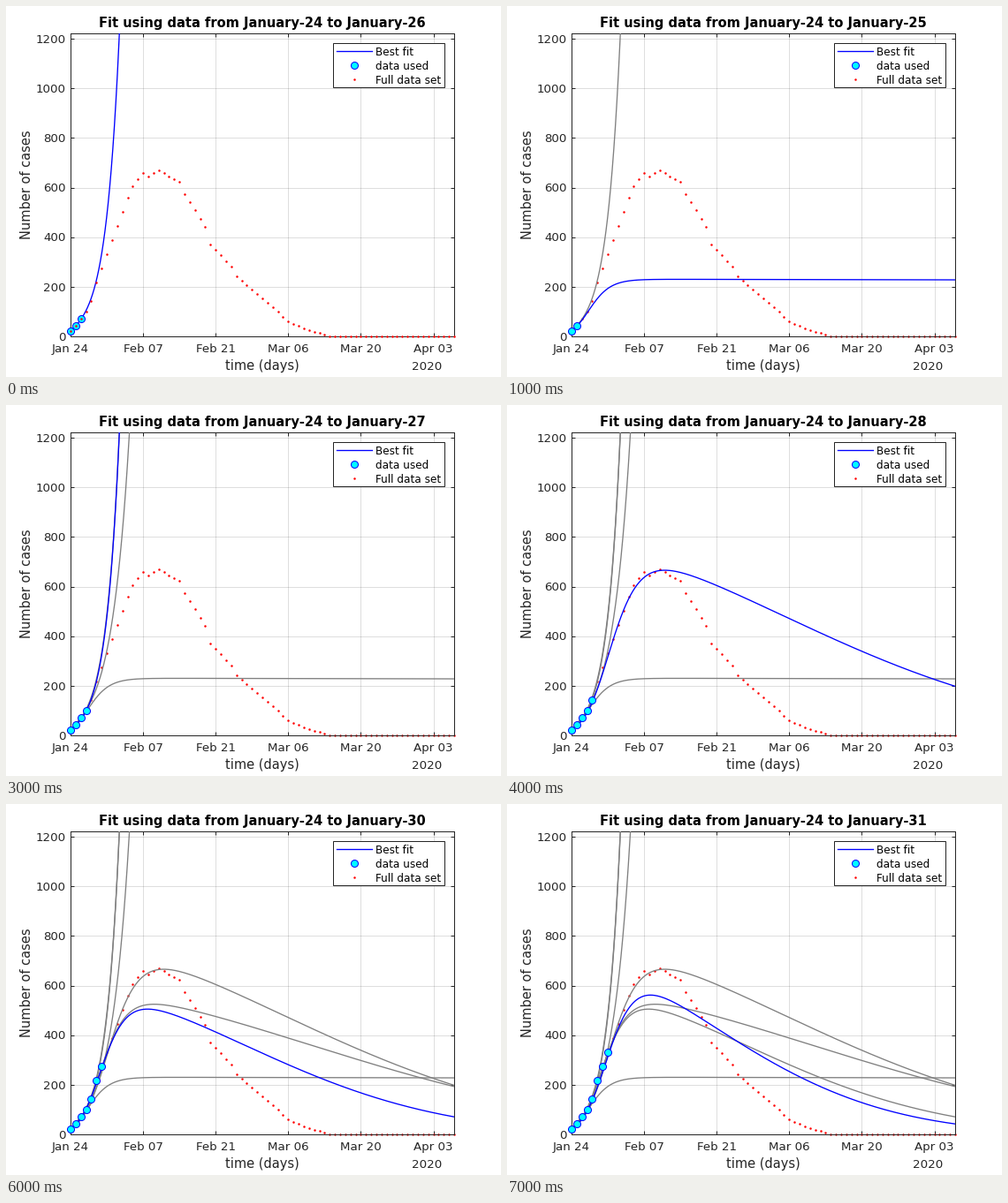
A matplotlib script that plays this animation: 560x420 px, repeating every 8 s.

```python
import numpy as np
import matplotlib.pyplot as plt
from matplotlib.animation import FuncAnimation
from matplotlib.patches import Rectangle

W, H = 560, 420
PT = 0.72  # points per pixel at 100 dpi
LEFT, TOP, WIDE, TALL = 73, 31, 434, 343
DAYS, CASES = 74, 1222
START = 23
INK = "#262626"
GRAY = "#808080"

plt.rcParams["font.family"] = "DejaVu Sans"

# Daily counts, straight between a few turning points
turns = [(0, START), (1, 43), (3, 101), (4, 144), (5, 219), (11, 561),
         (12, 606), (14, 660), (15, 645), (17, 670), (21, 623), (22, 574),
         (26, 442), (27, 372), (31, 282), (32, 244), (40, 98), (42, 60),
         (46, 25), (50, 0)]
days = np.arange(DAYS + 1)
cases = np.interp(days, *zip(*turns))

t = np.linspace(0, DAYS, 1481)


def growth(rate, boost):
    """Outbreak that starts fast and then grows exponentially."""
    y = START * np.exp(np.minimum(rate * t + boost * (1 - np.exp(-t)), 5))
    return np.where(y < 1500, y, np.nan)


def wave(size, rate, decay, bend):
    """Sigmoid rise towards size under a tail that falls ever faster."""
    q = np.sqrt(size / START) - 1
    return (size / (1 + q * np.exp(-rate * t)) ** 2
            * np.exp(-decay * t - bend * t ** 2))


fits = [
    growth(0.380, 0.393),
    wave(231, 0.45, 0.00018, 0),
    growth(0.2925, 0.65),
    growth(0.390, 0.30),
    wave(790, 0.311, 0.0039, 0.0002),
    wave(589, 0.363, 0.0031, 0.000162),
    wave(598, 0.36, 0.0037, 0.00034),
    wave(757, 0.324, 0.009, 0.000406),
]

fig = plt.figure(figsize=(W / 100, H / 100), dpi=100, facecolor="white")
ax = fig.add_axes([LEFT / W, 1 - (TOP + TALL) / H, WIDE / W, TALL / H])
ax.set_xlim(0, DAYS)
ax.set_ylim(0, CASES)
ax.set_xticks(range(0, 71, 14))
ax.set_yticks(range(0, 1201, 200))
ax.tick_params(direction="in", length=4.3 * PT, width=PT, color=INK, top=True,
               right=True, labelbottom=False, labelleft=False)
ax.grid(color=INK, alpha=0.15, linewidth=PT)
ax.set_axisbelow(True)
for spine in ax.spines.values():
    spine.set(color=INK, linewidth=PT)

# Page layer in pixels, y downwards, for text and legend
page = fig.add_axes([0, 0, 1, 1], zorder=5)
page.set_xlim(0, W)
page.set_ylim(H, 0)
page.axis("off")


def label(x, y, text, size=13.33, ha="center", color=INK, **kw):
    return page.text(x, y, text, fontsize=size * PT, ha=ha, va="baseline",
                     color=color, **kw)


for day, name in zip(range(0, 71, 14), ["Jan 24", "Feb 07", "Feb 21",
                                        "Mar 06", "Mar 20", "Apr 03"]):
    label(LEFT + day * WIDE / DAYS, 392, name)
for n in range(0, 1201, 200):
    label(67.5, TOP + TALL * (1 - n / CASES) + 4.7, str(n), ha="right")
label(476, 411.5, "2020")
label(289.5, 412, "time (days)", 14.67)
label(28, 202.5, "Number of cases", 14.67, rotation=90,
      rotation_mode="anchor")
title = label(290, 24.3, "", 14.67, color="black", weight="bold")

line_style = dict(color="blue", linewidth=1.33 * PT)
ring_style = dict(linestyle="none", marker="o", markersize=8 * PT,
                  markerfacecolor="cyan", markeredgecolor="blue",
                  markeredgewidth=PT)
dot_style = dict(linestyle="none", marker="o", markersize=2.5 * PT,
                 color="red", markeredgewidth=0)

page.add_patch(Rectangle((370, 42), 126, 50, facecolor="white",
                         edgecolor=INK, linewidth=PT))
page.plot([374, 414], [51, 51], **line_style)
page.plot([394], [67], **ring_style)
page.plot([394], [83], **dot_style)
for i, text in enumerate(["Best fit", "data used", "Full data set"]):
    label(417.5, 56 + 16 * i, text, 12, ha="left", color="black")

lines = [ax.plot(t, fit, **line_style, zorder=3 + 0.01 * i)[0]
         for i, fit in enumerate(fits)]
dots, = ax.plot(days, cases, clip_on=False, **dot_style)
rings, = ax.plot([], [], clip_on=False, zorder=4, **ring_style)


def draw(step):
    for i, line in enumerate(lines):
        line.set_visible(i <= step)
        line.set_color("blue" if i == step else GRAY)
    n = step + 1 if step else 3
    rings.set_data(days[:n], cases[:n])
    dots.set_zorder(2.5 if step else 4.5)
    title.set_text(f"Fit using data from January-24 to January-{23 + n}")
    return [*lines, dots, rings, title]


anim = FuncAnimation(fig, draw, frames=len(fits), interval=1000,
                     init_func=lambda: draw(0), repeat=True, repeat_delay=0)
plt.show()
```
